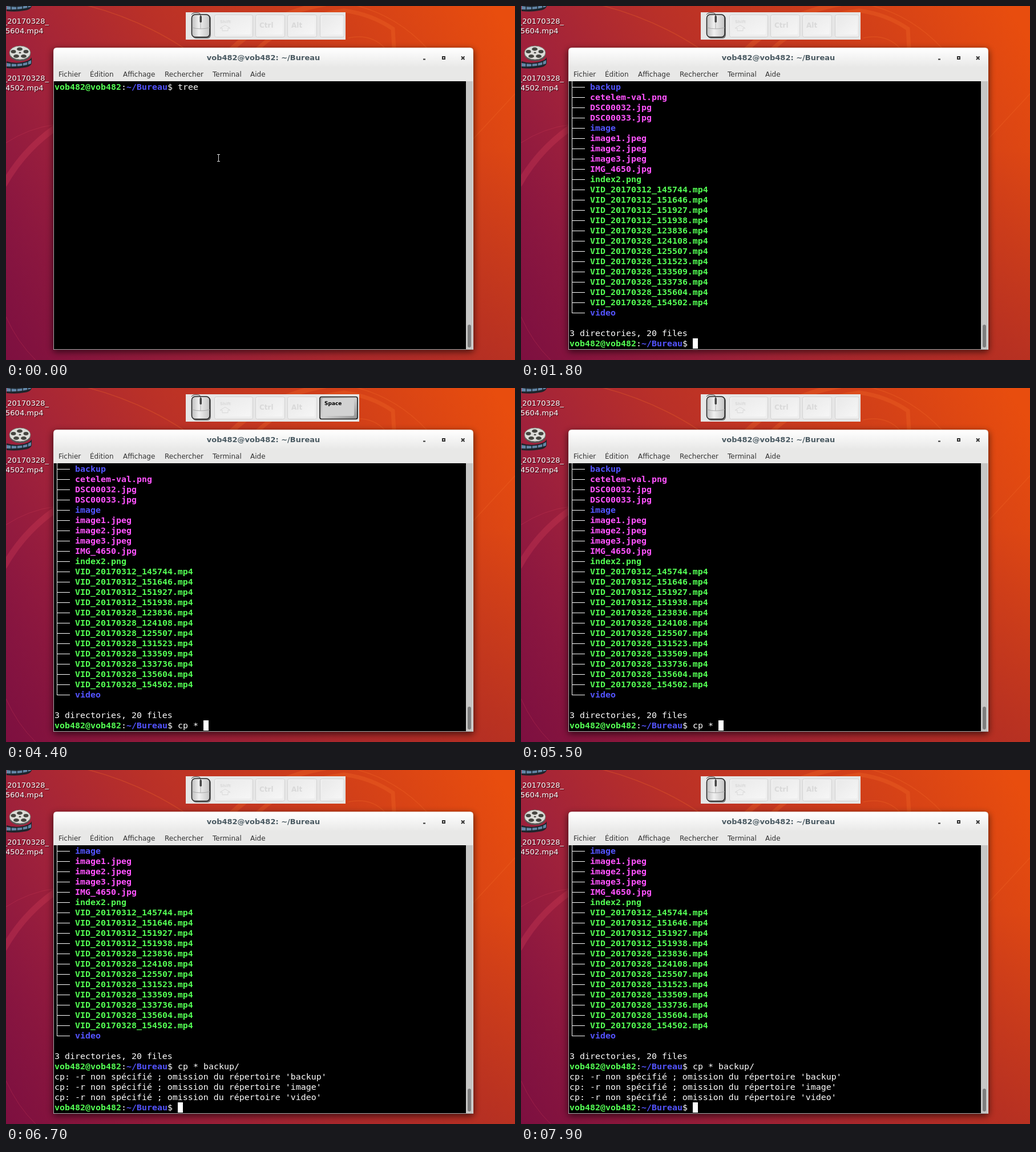
Animation of 892x621 px, one loop 8000 ms. Source, as an HTML page:

```html
<!DOCTYPE html>
<html lang="fr">
<head>
<meta charset="utf-8">
<title>Terminal</title>
<style>
html, body { margin: 0; width: 100%; height: 100%; overflow: hidden; background: #000; }
svg { display: block; width: 892px; height: 621px; }
text { font-family: "DejaVu Sans", sans-serif; white-space: pre; }
.term text { font: 14.95px "DejaVu Sans Mono", monospace; fill: #fff; }
.term .user { fill: #54ff54; font-weight: bold; }
.term .dir { fill: #5454ff; font-weight: bold; }
.term .img { fill: #ff54ff; font-weight: bold; }
.label { font-size: 13px; fill: #fff; text-anchor: middle; text-shadow: 1px 1px 1px #000a; }
.menu { font-size: 12px; fill: #333; }
.dim { fill: #d9d9d9; font-weight: bold; }
.cap { fill: #000; font-weight: bold; }
</style>
</head>
<body>
<svg id="stage" viewBox="0 0 892 621" xmlns="http://www.w3.org/2000/svg">
  <defs>
    <linearGradient id="sky" gradientUnits="userSpaceOnUse" x1="0" y1="621" x2="892" y2="60">
      <stop offset="0" stop-color="#780c47"/><stop offset=".31" stop-color="#a2233a"/>
      <stop offset=".5" stop-color="#b93028"/><stop offset=".7" stop-color="#ca3b1c"/>
      <stop offset="1" stop-color="#e84d0e"/>
    </linearGradient>
    <linearGradient id="dusk" x1="0" y1="0" x2="0" y2="1">
      <stop offset=".4" stop-color="#8a1830" stop-opacity="0"/><stop offset="1" stop-color="#8a1830" stop-opacity=".3"/>
    </linearGradient>
    <linearGradient id="bar" x1="0" y1="0" x2="0" y2="1">
      <stop offset="0" stop-color="#fff"/><stop offset="1" stop-color="#e8e8e7"/>
    </linearGradient>
    <linearGradient id="soft" x1="0" y1="0" x2="1" y2="1">
      <stop offset="0" stop-color="#e9e9e9"/><stop offset="1" stop-color="#f6f6f6"/>
    </linearGradient>
    <linearGradient id="hard" x1="0" y1="0" x2="1" y2="1">
      <stop offset="0" stop-color="#a9a9a9"/><stop offset=".5" stop-color="#d0d0d0"/><stop offset="1" stop-color="#8e8e8e"/>
    </linearGradient>
    <linearGradient id="body" x1="0" y1="0" x2="1" y2="0">
      <stop offset="0" stop-color="#bdbdbd"/><stop offset=".4" stop-color="#f0f0f0"/><stop offset="1" stop-color="#c4c4c4"/>
    </linearGradient>
    <filter id="blur" x="-10%" y="-10%" width="120%" height="120%"><feGaussianBlur stdDeviation="6"/></filter>
    <g id="film">
      <path d="M1 97Q20 103 38 96Q43 94 45 90V101Q42 107 32 108Q18 111 1 109Z" fill="#1d242b"/>
      <path d="M1 100Q20 104 36 99L44 95V101Q30 107 1 106Z" fill="#6386a6"/>
      <path d="M9 100V108M19 101V108M29 100V107M38 97V105" stroke="#1d242b" stroke-width="1.5"/>
      <ellipse cx="24.500" cy="84.500" rx="18.500" ry="12" fill="#555"/>
      <ellipse cx="24.500" cy="82" rx="18.500" ry="12" fill="#dcdcd8" stroke="#77776f"/>
      <g fill="#454540">
        <ellipse cx="24" cy="75.500" rx="5" ry="3"/><ellipse cx="35" cy="80" rx="4.500" ry="3"/>
        <ellipse cx="31" cy="88" rx="5" ry="3"/><ellipse cx="18" cy="88" rx="5" ry="3"/>
        <ellipse cx="13" cy="80" rx="4.500" ry="3"/><ellipse cx="24.500" cy="82" rx="2" ry="1.300"/>
      </g>
    </g>
  </defs>

  <rect width="892" height="621" fill="url(#sky)"/>
  <rect width="892" height="621" fill="url(#dusk)"/>
  <g fill="none" stroke="#f06a2a" stroke-opacity=".3">
    <path d="M-4 314Q30 253 86 214" stroke="#d8405a" stroke-width="11"/>
    <path d="M52 621Q20 590 0 545M0 240Q40 214 86 208" stroke="#d8405a" stroke-width="1"/>
    <path d="M395 76Q460 14 560 -4" stroke-width="9"/>
    <path d="M440 76Q500 20 592 8Q640 14 678 40L680 74" stroke-width="7"/>
    <path d="M600 -4Q680 12 738 74M600 56Q640 48 664 74M130 -4Q230 20 312 74" stroke-width="1.500"/>
    <path d="M818 234L892 154" stroke-width="1.500"/>
  </g>

  <use href="#film" y="-100"/>
  <use href="#film"/>
  <g id="labels"></g>

  <rect x="82" y="76" width="738" height="531" rx="6" fill="#000" opacity=".6" filter="url(#blur)"/>
  <path d="M83 603V79Q83 73 89 73H813Q819 73 819 79V603Z" fill="#e8e8e7"/>
  <path d="M84 108V79Q84 74 89 74H813Q818 74 818 79V108Z" fill="url(#bar)"/>
  <text x="451" y="95" font-size="13" font-weight="bold" fill="#4a5a62" text-anchor="middle" id="title"></text>
  <g fill="none" stroke="#333" stroke-width="2">
    <path d="M731 93.500H735"/><rect x="765" y="89" width="4" height="4"/><path d="M798 88.500L803.500 94M803.500 88.500L798 94"/>
  </g>
  <g id="menus"></g>
  <rect x="84" y="132" width="722" height="470" fill="#000"/>
  <rect x="806" y="132" width="12" height="470" fill="#c6c6c5"/>
  <rect x="809" y="559" width="6" height="40" rx="3" fill="#7d7d7d"/>
  <path d="M83.500 132V602.500H818.500" fill="none" stroke="#a9a9a9"/>
  <g class="term">
    <g id="first"></g><g id="list"></g><g id="errors"></g>
    <text id="typed" x="301"></text>
    <rect id="cursor" width="9" height="18" fill="#fff"/>
  </g>
  <path id="beam" d="M370 260.500H375M372.500 260V273M370 272.500H375" stroke="#ddd" fill="none"/>

  <rect id="panel" x="315" y="11" height="48" fill="#e6e6e6"/>
  <rect x="327" y="16" width="32" height="41" rx="6" fill="#000" opacity=".5"/>
  <rect x="325.500" y="15" width="31.500" height="39.500" rx="6" fill="url(#body)" stroke="#222" stroke-width="1.500"/>
  <path d="M326 38Q341 42 357 38M341 15V40" fill="none" stroke="#aaa"/>
  <path d="M341 18Q342 12 335 12Q328 11 325 15" fill="none" stroke="#333"/>
  <rect x="339.500" y="17" width="3.500" height="12" rx="1.700" fill="#444"/>
  <g id="keys"></g>
  <text class="dim" x="375" y="30" font-size="7">Shift</text>
  <path d="M384 33.500L393 39H389V43.500H379V39H375Z" fill="none" stroke="#d9d9d9"/>
  <text class="dim" x="444" y="38" font-size="12">Ctrl</text>
  <text class="dim" x="500" y="38" font-size="12">Alt</text>
  <g id="press">
    <rect id="edge" x="550" y="15.500" height="39" rx="3" fill="url(#hard)" stroke="#222" stroke-width="1.700"/>
    <rect id="face" x="554" y="18" height="31" rx="2" fill="#d2d2d2"/>
    <text id="cap" class="cap"></text>
    <path id="mark" fill="none" stroke="#000"/>
  </g>
</svg>
<script>
const $ = id => document.getElementById(id);
const LOOP = 8000, CELL = 9, ROW = 18, LEFT = 85, TOP = 133;
const user = "vob482@vob482", cwd = "~/Bureau";

function add(parent, tag, attrs, content) {
  const el = document.createElementNS("http://www.w3.org/2000/svg", tag);
  for (const k in attrs) el.setAttribute(k, attrs[k]);
  if (content) el.textContent = content;
  return parent.appendChild(el);
}

const put = (parent, row, col, str, cls = "") =>
  add(parent, "text", { x: LEFT + col * CELL, y: TOP + row * ROW + 14, class: cls }, str);

function prompt(parent, row, command = "") {
  put(parent, row, 0, user, "user");
  put(parent, row, 13, ":");
  put(parent, row, 14, cwd, "dir");
  put(parent, row, 22, "$");
  if (command) put(parent, row, 24, command);
}

// Desktop, title bar and overlay
$("title").textContent = `${user}: ${cwd}`;
["135604.mp4", "154502.mp4"].forEach((name, i) =>
  ["VID_20170328_", name].forEach((line, j) =>
    add($("labels"), "text", { class: "label", x: 24, y: 31 + 100 * i + 17 * j }, line)));
[["Fichier", 92], ["Édition", 147], ["Affichage", 205], ["Rechercher", 278], ["Terminal", 362], ["Aide", 428]]
  .forEach(([name, x]) => add($("menus"), "text", { class: "menu", x, y: 124 }, name));
[[365, 68], [437, 52], [493, 52], [550, 43]].forEach(([x, w]) => {
  add($("keys"), "rect", { x: x + .5, y: 15.5, width: w - 1, height: 39, rx: 3, fill: "#eee", stroke: "#d2d2d2" });
  add($("keys"), "rect", { x: x + 4, y: 18, width: w - 8, height: 32, rx: 2, fill: "url(#soft)" });
});

// Terminal contents
const videos = ["0312_145744", "0312_151646", "0312_151927", "0312_151938", "0328_123836", "0328_124108",
  "0328_125507", "0328_131523", "0328_133509", "0328_133736", "0328_135604", "0328_154502"];
const files = [
  ["dir", "backup"],
  ...["cetelem-val.png", "DSC00032.jpg", "DSC00033.jpg"].map(f => ["img", f]),
  ["dir", "image"],
  ...["image1.jpeg", "image2.jpeg", "image3.jpeg", "IMG_4650.jpg"].map(f => ["img", f]),
  ["user", "index2.png"],
  ...videos.map(v => ["user", `VID_2017${v}.mp4`]),
  ["dir", "video"]
];

function drawTree(parent, skip) {
  const shown = files.slice(skip), last = shown.length - 1;
  add(parent, "rect", { x: 89, y: TOP - 1, width: 1, height: last * ROW + 11, fill: "#fff" });
  shown.forEach(([cls, name], i) => {
    add(parent, "rect", { x: 89, y: TOP + i * ROW + 9, width: 23, height: 1, fill: "#fff" });
    put(parent, i, 4, name, cls);
  });
  put(parent, last + 2, 0, "3 directories, 20 files");
}

prompt($("first"), 0);
drawTree($("list"), 0);
prompt($("list"), 25);
drawTree($("errors"), 4);
prompt($("errors"), 21, "cp * backup/");
["backup", "image", "video"].forEach((dir, i) =>
  put($("errors"), 22 + i, 0, `cp: -r non spécifié ; omission du répertoire '${dir}'`));
prompt($("errors"), 25);

// time, screen, typed command, cursor on, pressed key
const steps = [
  [0, "first", "tree", 0, ""],
  [500, "first", "tree", 0, "Enter"],
  [600, "list", "", 1, "Enter"],
  [1200, "list", "", 0, ""],
  [1800, "list", "", 1, ""],
  [2000, "list", "c", 1, "C"],
  [2200, "list", "cp", 1, "P"],
  [2400, "list", "cp ", 1, "Space"],
  [3000, "list", "cp ", 0, ""],
  [3400, "list", "cp *", 1, ""],
  [4000, "list", "cp *", 0, ""],
  [4300, "list", "cp * ", 1, ""],
  [4400, "list", "cp * ", 1, "Space"],
  [4900, "list", "cp * ", 0, ""],
  [5500, "list", "cp * ", 1, ""],
  [5800, "list", "cp * b", 1, "B"],
  [5900, "list", "cp * backup/", 1, "Tab"],
  [6500, "list", "cp * backup/", 0, ""],
  [6700, "errors", "", 1, ""],
  [6800, "errors", "", 1, "Enter"],
  [7300, "errors", "", 0, ""],
  [7900, "errors", "", 1, ""]
];
const marks = {
  Enter: "M575 33.500H571V37.500H562V35L558 38.500L562 42V39.500H575Z",
  Tab: "M558 36.500H572M568 33.500L572 36.500L568 39.500M573.500 33V40"
};
const show = (id, on) => $(id).setAttribute("visibility", on ? "visible" : "hidden");
const set = (id, attrs) => { for (const k in attrs) $(id).setAttribute(k, attrs[k]); };

function drawKey(key) {
  const wide = key.length > 1;
  show("press", key);
  set("panel", { width: wide ? 304 : 280 });
  set("edge", { width: wide ? 66 : 41.5 });
  set("face", { width: wide ? 56 : 32 });
  set("cap", wide
    ? { x: 558, y: 30, "font-size": 9, "text-anchor": "start" }
    : { x: 571, y: 38.5, "font-size": 14, "text-anchor": "middle" });
  $("cap").textContent = key;
  set("mark", { d: marks[key] || "" });
}

function render(ms) {
  const [, screen, typed, blink, key] = steps.findLast(s => s[0] <= ms);
  const row = screen === "first" ? 0 : 25, y = TOP + row * ROW;
  ["first", "list", "errors"].forEach(id => show(id, id === screen));
  $("typed").textContent = typed;
  set("typed", { y: y + 14 });
  set("cursor", { x: LEFT + (24 + typed.length) * CELL, y });
  show("cursor", blink);
  show("beam", ms < 500);
  drawKey(key);
}

const start = performance.now();
function tick() {
  render((performance.now() - start) % LOOP);
  requestAnimationFrame(tick);
}
tick();
</script>
</body>
</html>
```
